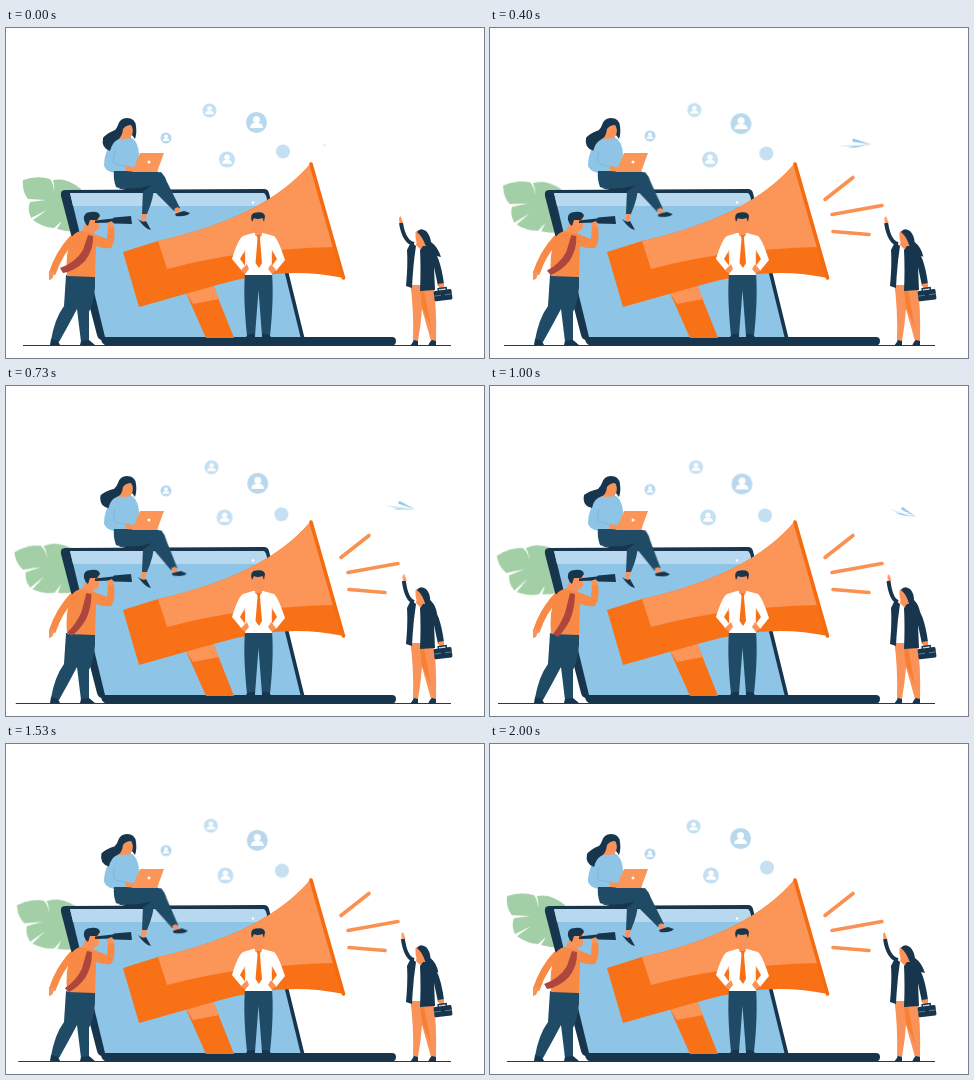
Write an HTML page that moves like this. It is 478 px wide and 330 px high and loops after 2070 ms.

```html
<!DOCTYPE html>
<html lang="en">
<head>
<meta charset="utf-8">
<title>Megaphone announcement</title>
<style>
  html, body { margin: 0; width: 100%; height: 100%; overflow: hidden; background: #fff; }
  svg { display: block; width: 478px; height: 330px; }

  .ink { fill: #17364e; }
  .navy { fill: #1f4b67; }
  .skin { fill: #fa935a; }
  .orange { fill: #f97116; }
  .peach { fill: #fb9558; }
  .sky { fill: #8ec4e5; }
  .pale { fill: #b8d8ef; }
  .white { fill: #fff; }

  /* Half a loop out, half a loop back, on a sine curve */
  .sway { animation: 1.035s cubic-bezier(.37, 0, .63, 1) infinite alternate; }
  .drift { animation-name: drift; }
  .ground { animation-name: ground; }
  .leaf { animation-name: leaf; transform-origin: 80px 200px; }
  .foot { animation-name: foot; transform-origin: 152px 148px; }
  .tie { animation-name: tie; }
  .longhair { animation-name: longhair; }
  .wavehair { animation-name: wavehair; }
  .arm { animation-name: arm; }
  .hand { animation-name: hand; }
  .plane { animation: plane 2.07s linear infinite; }
  .shout { animation: shout 2.07s step-end infinite; }

  @keyframes drift { to { transform: translate(var(--dx), var(--dy)); } }
  @keyframes ground { to { d: path("M8 317.5H445"); } }
  @keyframes leaf { to { transform: rotate(-15deg); } }
  @keyframes foot { to { transform: rotate(6deg); } }
  @keyframes hand { to { transform: translate(4.5px, 0); } }
  @keyframes tie {
    to { d: path("M80 207L85 208Q85 222 80 234Q75 244 68 251L63 248Q71 238 75 227Z"); }
  }
  @keyframes longhair {
    to { d: path("M112 97Q114 90 121 90Q129 90 130 98Q131 106 129 111L126 107Q128 101 125 97Q120 97 117 101Q116 110 110 111Q104 113 102 122Q92 120 94 109Q99 105 108 103Q111 100 112 97Z"); }
  }
  @keyframes wavehair {
    to { d: path("M411 204Q414 199 420 203Q424 207 424 214Q430 220 430 228Q422 226 419 218Q417 209 411 204Z"); }
  }
  @keyframes arm {
    to { d: path("M408 216Q401 214 398.5 195"); }
  }
  @keyframes plane {
    0% { transform: translate(318px, 117px) rotate(-10deg) scale(.15); }
    9.66% { transform: translate(341px, 115px) rotate(-12deg) scale(1); }
    25.6% { transform: translate(381px, 115.5px) scale(1); }
    48.3% { transform: translate(413px, 125.5px) rotate(14deg) scale(.88); }
    64.25% { transform: translate(420.5px, 128px) rotate(6deg) scale(.18); }
    67.6%, 100% { transform: translate(421px, 128px) scale(0); }
  }
  @keyframes shout {
    0% { opacity: 0; }
    6% { opacity: 1; }
    55% { opacity: 0; }
    67.5%, 100% { opacity: 1; }
  }
</style>
</head>
<body>
<svg viewBox="0 0 478 330">
  <defs>
    <g id="user" class="white">
      <circle cy="-3" r="3.500"/>
      <path d="M-6.500 5.600Q-6.300 1 -2 .6L2 .6Q6.300 1 6.500 5.600Z"/>
    </g>
  </defs>

  <!-- Leaf and ground -->
  <path class="sway leaf" fill="#a2cfa5" d="M17 152Q31 147 44 151Q48 156 48 164Q49 158 47 152Q61 149 75 161L86 202Q68 206 51 201L56 193L48 200Q36 199 27 192L41 182L25 190Q21 182 24 174L40 172L22 171Q16 164 17 152Z"/>
  <path class="sway ground" d="M17 317.5H445" stroke="#263b49"/>

  <!-- Floating profiles -->
  <g id="bubbles"></g>

  <!-- Paper plane -->
  <g class="plane">
    <path fill="#c4dff2" d="M-17 1L16 2.500L-6 2.800Z"/>
    <path fill="#8fc4e6" d="M-2 -5L16 2.500L-3 -2Z"/>
    <path fill="#58a6d8" d="M-8 3.500L16 2.300L-2 4Z"/>
  </g>

  <!-- Laptop -->
  <path class="ink" d="M59 162L258 161Q262 161 263 165L299 312H97Q92 312 91 307L55 168Q54 162 59 162Z"/>
  <path class="sky" d="M64 165H257Q259 165 260 168L294.500 309H99Z"/>
  <path class="pale" d="M64 165H257Q259 165 260 168L262.400 178H67Z"/>
  <circle class="white" cx="247" cy="174.5" r="1.2"/>
  <path class="ink" d="M95 309H386Q390 309 390 313Q390 317 386 317.5H101Q95 317 95 309Z"/>

  <!-- Megaphone -->
  <path class="orange" d="M180 265L207 257L228 310H200Z"/>
  <path class="peach" d="M180 265L207 257L213 271L187 276Z"/>
  <path class="orange" d="M117 224L152 213Q260 189 305 135L338 250Q278 237 211 257L133 279Z"/>
  <path class="peach" d="M152 213Q260 189 304 136L328 219Q235 221 161 241Z"/>
  <path d="M305 136L337.5 250" stroke="#f56b10" stroke-width="3.600" stroke-linecap="round"/>
  <g class="shout" stroke="#fa9152" stroke-width="3.6" stroke-linecap="round">
    <path d="M335 171.5L363 149.5M342 186.5L392 177.5M343 203.5L379 206.5"/>
  </g>

  <!-- Man with hands on hips -->
  <path class="navy" d="M239 245H266Q268 270 264 308H256L252.500 262L249 308H241Q237 270 239 245Z"/>
  <path class="ink" d="M240 309Q242 305 249 306L249 309ZM256 309L256 306Q262 305 265 309Z"/>
  <path class="white" d="M247 205L257 205L268 208Q272 211 279 232L270 243L265 239L271 231L266 222L266 247H239L239 222L234 231L240 239L236 243L226 231Q232 211 237 208Z"/>
  <path d="M239 222L240 236M266 222L265 236" stroke="#d6e3ec" stroke-width=".8"/>
  <path class="skin" d="M235 242L241 236L243 241L239 246ZM270 242L265 236L262 241L266 246ZM249 201H256V207L252.5 210L249 207Z"/>
  <path class="orange" d="M251 207H254.500L254 211L256 235L253 240L249.500 235L251.500 211Z"/>
  <path class="skin" d="M246.500 189H258V198Q257 205 252.500 206Q247 204 246.500 198Z"/>
  <path class="ink" d="M246 194Q243 185 250 184.500Q258 183 259 188L258 194L256.500 190Q251 192 248 190Z"/>

  <!-- Woman with laptop -->
  <path class="skin" d="M114 104H125V113L119 116L112 112Z"/>
  <path class="sky" d="M108 110L116 111L126 110Q132 114 133 126L131 143L108 145Q98 142 98 137Q98 128 103 118Q105 112 108 110Z"/>
  <path d="M109 123Q106 133 109 136L124 139" fill="none" stroke="#7ab5da" stroke-width=".8"/>
  <path class="skin" d="M116 96Q119 92 127 95L127 104Q126 110 121 110L115 106Z"/>
  <path class="sway longhair ink" d="M112 97Q114 90 121 90Q129 90 130 98Q131 106 129 111L126 107Q128 101 125 97Q120 97 117 101Q116 110 111 112Q106 115 104 123Q95 120 97 110Q101 105 109 102Q111 100 112 97Z"/>
  <g class="sway foot">
    <path class="navy" d="M142 147L155 144Q159 148 161 154L174 180L168 183L146 161Z"/>
    <path class="skin" d="M168 181L172 179L176 185L171 186Z"/>
    <path class="ink" d="M169 186Q174 184 178 183L184 185Q180 189 170 188Z"/>
  </g>
  <path class="navy" d="M108 143H148Q157 144 157 150Q154 156 148 158Q148 170 141 186L136 186L137 162Q121 162 110 159Q107 151 108 143Z"/>
  <path class="ink" d="M110 159Q126 163 146 157L138 163Q119 164 110 159Z"/>
  <path class="skin" d="M136 186L141 186L139 193L135 193Z"/>
  <path class="ink" d="M132 191Q137 195 140 193L145 202Q140 202 132 191Z"/>
  <path class="skin" d="M119 138L128 139L131 144L120 143Z"/>
  <path class="peach" d="M134 125H158L151 144H126Z"/>
  <circle class="white" cx="143" cy="134" r="1.5"/>

  <!-- Man with telescope -->
  <path class="navy" d="M60 247L89 248Q90 270 83 284L83 314H75L71 281Q62 298 53 314L45 312Q49 290 58 278Z"/>
  <path class="ink" d="M45 311L52 313L54 317H44ZM75 313L83 312L89 317H74Z"/>
  <path d="M67 210Q53 225 46 246" fill="none" stroke="#f98a45" stroke-width="7"/>
  <path class="skin" d="M43 243L49 244L46 251L43 252Z"/>
  <path class="skin" d="M79 196L88 198L88 206L82 210L75 205Z"/>
  <path fill="#f98a45" d="M74 203L88 206L101 211L102 199L108 198Q110 214 105 220Q98 221 90 218L89 249L61 248Q59 227 65 210Q68 205 74 203Z"/>
  <path class="sway tie" fill="#ad473e" d="M82 207L87 208Q88 221 79 233Q69 243 57 245L54 240Q70 234 77 222Z"/>
  <path class="skin" d="M80 189Q90 185 93 190L93 199Q91 205 85 203L79 200Z"/>
  <path class="ink" d="M78 192Q77 184 85 184Q93 183 94 188L91 192L84 192L82 198Q79 196 78 192Z"/>
  <path class="ink" d="M89 192.500L107 190.500L108 189.500L125 188L126 196L108 195.500L107 194.500L89 195Z"/>
  <path class="skin" d="M101 195L106 193L108 199L102 200Z"/>

  <!-- Woman with briefcase -->
  <path class="skin" d="M404 253H427Q431 280 430 313H425L416 281Q415 296 412 313H407Q408 282 404 253Z"/>
  <path class="orange" d="M414 262L418 262L425 300L416 279Z" opacity=".6"/>
  <path class="ink" d="M404 318Q407 314 408 312L412 313L412 318ZM422 318Q424 313 426 312L430 313V318Z"/>
  <path class="white" d="M406 217L417 217V257H405Z"/>
  <path class="skin" d="M411 212L419 211L419 218L414 221L410 217Z"/>
  <path class="ink" d="M405 214L410 218Q407 237 406 260L400 258Q402 237 401 222ZM417 218L424 218Q434 226 438 256L432 258L428 239L429 262L414 263Q415 240 414 222Z"/>
  <path class="sway arm" d="M408 216Q398 214 395 195" fill="none" stroke="#17364e" stroke-width="4"/>
  <path class="sway hand skin" d="M393.500 195L393 190L394.500 188L397 195Z"/>
  <path class="skin" d="M409.500 204Q413 201 418 205L418 213Q416 218 412 216Q409 213 409.500 204Z"/>
  <path class="sway wavehair ink" d="M411 204Q414 199 420 203Q424 207 425 214Q432 219 435 229Q424 227 420 219Q417 209 411 204Z"/>
  <path class="skin" d="M432 256L438 255L438 261L434 262Z"/>
  <g transform="rotate(-7 437 267)">
    <rect class="ink" x="428" y="262" width="18" height="10.500" rx="1.500"/>
    <path d="M433 262.500V260H441V262.500" fill="none" stroke="#17364e" stroke-width="1.500"/>
    <path d="M428 267H435M439 267H446" stroke="#7892a1" stroke-width=".7"/>
  </g>
</svg>
<script>
  // x, y, radius, drift x, drift y, colour, has icon
  const bubbles = [
    [203.5, 82.5, 7, 2.5, -1.5, '#c4e0f2', true],
    [250.5, 94.5, 10.5, 1.5, 3.5, '#b8d8ee', true],
    [221, 131.5, 8, -3, 0, '#c4e0f2', true],
    [277, 123.5, 7, -2, 6, '#c4e0f2', false],
    [160, 110, 5.5, 0, -6.5, '#b8d8ee', true]
  ];
  document.getElementById('bubbles').innerHTML = bubbles.map(([x, y, r, dx, dy, fill, icon]) =>
    `<g class="sway drift" style="--dx:${dx}px;--dy:${dy}px">
      <g transform="translate(${x} ${y})"><circle r="${r}" fill="${fill}"/>
      ${icon ? `<use href="#user" transform="scale(${r / 10.5})"/>` : ''}</g>
    </g>`).join('');
</script>
</body>
</html>
```
